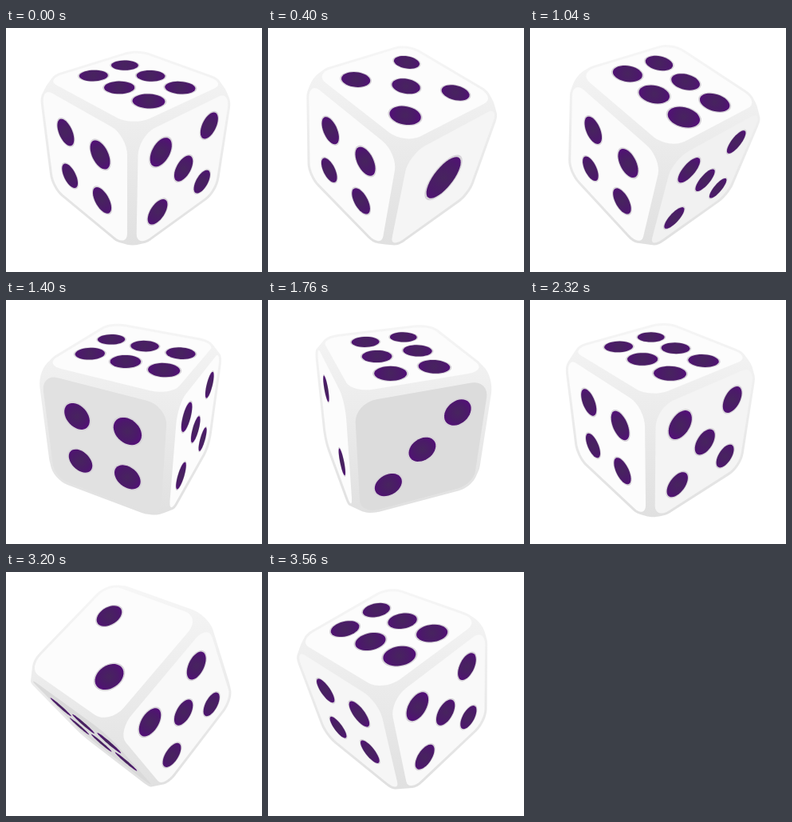
Write an HTML page with a canvas that moves like this. It is 321 px wide and 305 px high and loops after 3.6 s.

```html
<!DOCTYPE html>
<html>
<head>
<meta charset="utf-8">
<title>Rolling die</title>
<style>
html, body { margin: 0; width: 100%; height: 100%; overflow: hidden; background: #fff; }
canvas { display: block; }
</style>
</head>
<body>
<canvas id="stage" width="321" height="305"></canvas>
<script>
const ctx = document.getElementById('stage').getContext('2d');
const LOOP = 3600, TICK = 40, ROLL = 1200;
const SCALE = 80, DEPTH = 0.165;          // perspective: px per unit, 1 / camera distance
const YAW = 46 * Math.PI / 180, PITCH = 32 * Math.PI / 180;
const FLAT = 0.91, CORNER = 0.27;         // flat part of each face and its corner radius
const X = 0, Y = 1, Z = 2;

const square = d => [[-d, -d], [d, -d], [-d, d], [d, d]];
const diagonal = d => [[d, d], [-d, -d]];
const sixes = [-0.57, 0, 0.57].flatMap(u => [[u, -0.31], [u, 0.31]]);

// Each face: normal axis, its sign, the two axes in its plane, pips and their radius
const faces = [
  { n: Y, sign: -1, u: X, v: Z, pips: [[0, 0]], r: 0.36 },
  { n: Z, sign: -1, u: X, v: Y, pips: diagonal(0.4), r: 0.2 },
  { n: X, sign: -1, u: Z, v: Y, pips: [[0, 0], ...diagonal(0.49)], r: 0.2 },
  { n: Z, sign: 1, u: X, v: Y, pips: square(0.385), r: 0.203 },
  { n: X, sign: 1, u: Z, v: Y, pips: [[0, 0], ...square(0.5)], r: 0.2 },
  { n: Y, sign: 1, u: X, v: Z, pips: sixes, r: 0.21 }
];

const mix = (a, p, b, q) => a.map((value, i) => value * p + b[i] * q);
const easeInOut = t => t < 0.5 ? 2 * t * t : 1 - 2 * (1 - t) ** 2;

function restAxes() {
  const s = Math.sin(YAW), c = Math.cos(YAW), sp = Math.sin(PITCH), cp = Math.cos(PITCH);
  return [[c, -s * sp, s * cp], [0, cp, sp], [-s, -c * sp, c * cp]];
}

function turn(axes, from, to, angle) {
  const s = Math.sin(angle), c = Math.cos(angle), a = axes[from], b = axes[to];
  axes[from] = mix(a, c, b, s);
  axes[to] = mix(b, c, a, -s);
}

function pose(time) {
  const axes = restAxes(), t = time % ROLL / ROLL, full = 2 * Math.PI;
  const roll = Math.floor(time / ROLL);
  if (roll === 0) turn(axes, X, Y, easeInOut(t) * full);
  else if (roll === 1) turn(axes, Z, X, easeInOut(t) * full);
  else turn(axes, Z, Y, t * full);
  return axes;
}

function project([x, y, z]) {
  const k = SCALE / (1 - DEPTH * z);
  return [x * k, -y * k];
}

function trace(points) {
  ctx.beginPath();
  points.forEach(p => ctx.lineTo(...p));
  ctx.closePath();
}

function arc(cx, cy, r, start, sweep, steps) {
  return Array.from({ length: steps + 1 }, (_, i) => {
    const a = start + sweep * i / steps;
    return [cx + r * Math.cos(a), cy + r * Math.sin(a)];
  });
}

function roundedSquare(half, r) {
  const m = half - r, q = Math.PI / 2;
  return [[m, m], [-m, m], [-m, -m], [m, -m]]
    .flatMap(([x, y], i) => arc(x, y, r, i * q, q, 8));
}

function convexHull(points) {
  const sorted = [...points].sort((a, b) => a[0] - b[0] || a[1] - b[1]);
  const turnsIn = (a, b, c) =>
    (b[0] - a[0]) * (c[1] - a[1]) <= (b[1] - a[1]) * (c[0] - a[0]);
  const chain = list => {
    const side = [];
    for (const p of list) {
      while (side.length > 1 && turnsIn(side.at(-2), side.at(-1), p)) side.pop();
      side.push(p);
    }
    return side.slice(0, -1);
  };
  return [...chain(sorted), ...chain(sorted.reverse())];
}

function drawPip(place, [u, v], r) {
  const disc = radius => trace(arc(u, v, radius, 0, 2 * Math.PI, 36).map(place));
  disc(r * 1.1);
  ctx.fillStyle = '#d6d2d8';
  ctx.fill();
  const [x, y] = place([u, v]);
  const ink = ctx.createRadialGradient(x, y, 0, x, y, r * 95);
  ink.addColorStop(0, '#47245e');
  ink.addColorStop(0.6, '#4b1a69');
  ink.addColorStop(1, '#530f78');
  disc(r);
  ctx.fillStyle = ink;
  ctx.fill();
}

function drawBody(outline) {
  const shade = ctx.createLinearGradient(0, -120, 0, 130);
  shade.addColorStop(0, '#f6f6f6');
  shade.addColorStop(1, '#e0e0e0');
  ctx.fillStyle = ctx.strokeStyle = shade;
  ctx.lineJoin = 'round';
  ctx.lineWidth = 6;
  trace(convexHull(outline));
  ctx.fill();
  ctx.stroke();
}

function brightness([x, y]) {
  const light = 210 + 80 * x * x + 70 * Math.max(0, y) - 100 * Math.max(0, -y - 0.5);
  return Math.min(252, light);
}

function draw(time) {
  const axes = pose(time), flat = roundedSquare(FLAT, CORNER);
  const placer = face => ([u, v]) => project(
    mix(mix(axes[face.n], face.sign, axes[face.u], u), 1, axes[face.v], v));

  ctx.setTransform(1, 0, 0, 1, 0, 0);
  ctx.fillStyle = '#fff';
  ctx.fillRect(0, 0, 321, 305);
  ctx.translate(161.5, 141);
  ctx.rotate(0.013);
  drawBody(faces.flatMap(face => flat.map(placer(face))));

  for (const face of faces) {
    const normal = axes[face.n].map(value => value * face.sign);
    if (normal[2] <= DEPTH) continue;     // turned away from the camera
    const place = placer(face), light = brightness(normal);
    trace(flat.map(place));
    ctx.fillStyle = `rgb(${light}, ${light}, ${light})`;
    ctx.fill();
    face.pips.forEach(pip => drawPip(place, pip, face.r));
  }
}

const start = performance.now();
function frame() {
  const time = (performance.now() - start) % LOOP;
  draw(Math.floor(time / TICK) * TICK);
  requestAnimationFrame(frame);
}
frame();
</script>
</body>
</html>
```
